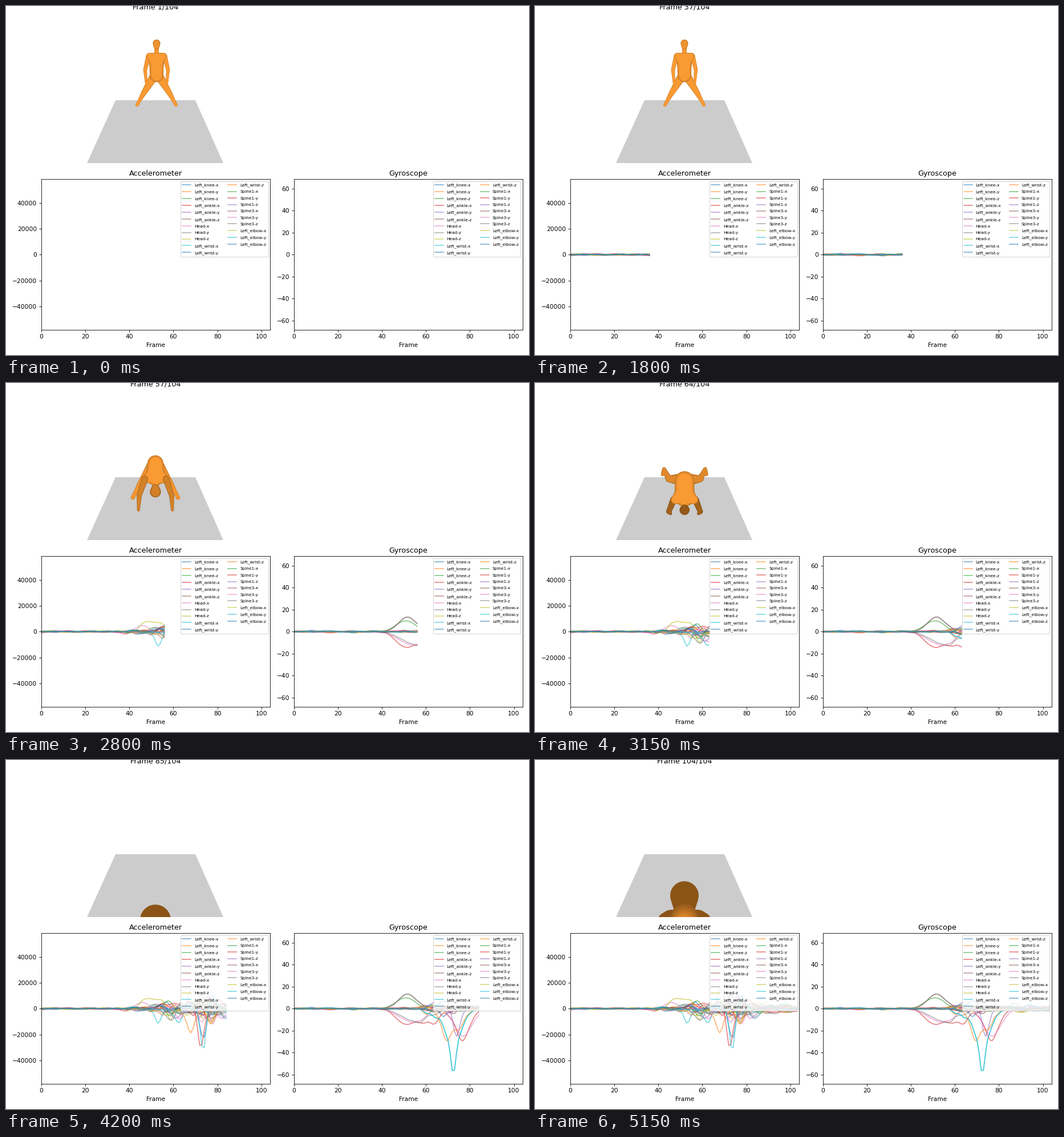
Recreate the animation shown at these times as a matplotlib script. Size 917x611 px, loop 5.2 s.

```python
import numpy as np
import matplotlib.pyplot as plt
from matplotlib.animation import FuncAnimation
from matplotlib.collections import PolyCollection
from matplotlib.colors import to_rgb
from matplotlib.patches import Polygon

W, H, DPI, N = 917, 611, 76.4, 104
plt.rcParams["font.family"] = "DejaVu Sans"
fig = plt.figure(figsize=((W + 0.001) / DPI, (H + 0.001) / DPI), dpi=DPI, facecolor="white")


def axes_px(x0, y0, x1, y1):
    return fig.add_axes([x0 / W, 1 - y1 / H, (x1 - x0) / W, (y1 - y0) / H])


def smooth(k, a, b):
    u = np.clip((k - a) / (b - a), 0, 1)
    return u * u * (3 - 2 * u)


def bump(k, c, w):
    return np.exp(-0.5 * ((k - c) / w) ** 2)


# --- sensor data -------------------------------------------------------
PARTS = ["Left_knee", "Left_ankle", "Head", "Left_wrist", "Spine1", "Spine3", "Left_elbow"]
LABELS = [f"{p}-{a}" for p in PARTS for a in "xyz"]
t = np.arange(N)

# strongest swings: channel, centre, height, width
ACC_SWINGS = [
    ("Head-z", 50, 9500, 3.4), ("Head-z", 59, -10500, 1.9), ("Head-x", 45, 5000, 2.5),
    ("Left_wrist-x", 53, -10000, 1.3), ("Left_wrist-z", 67.8, -20000, 1.8),
    ("Left_ankle-x", 72.4, -22000, 1.2), ("Left_elbow-y", 73.7, -31500, 1.2),
    ("Head-x", 78, -17000, 1.6),
]
GYRO_SWINGS = [
    ("Knee-turn", 0, 0, 1), ("Left_knee-z", 51, 10, 4.5), ("Spine3-z", 52, 13.5, 4.2),
    ("Left_ankle-x", 51, -14, 4.3), ("Left_ankle-x", 62, -15, 4), ("Left_ankle-x", 77, -30, 2.8),
    ("Head-y", 56, -12, 7), ("Head-x", 54, -12, 6), ("Head-x", 77, -24, 4),
    ("Left_wrist-z", 71.5, -27, 4), ("Left_ankle-y", 74, -27, 1.6),
    ("Left_wrist-x", 72.5, -33, 1.1), ("Left_wrist-x", 72, -29, 4.4),
][1:]


def signals(swings, envelope, seed):
    rng = np.random.default_rng(seed)
    kernel = bump(np.arange(-5, 6), 0, 1.4)
    rows = {}
    for name in LABELS:
        noise = np.convolve(rng.normal(size=N + 10), kernel, "valid")
        rows[name] = envelope * rng.uniform(0.5, 1.4) * noise / noise.std()
    for name, c, h, w in swings:
        rows[name] += h * bump(t, c, w)
    return rows


acc = signals(ACC_SWINGS, 260 + 700 * bump(t, 45, 5) + 3000 * bump(t, 60, 5)
              + 5500 * bump(t, 74, 5) + 1500 * bump(t, 90, 9), 4)
gyro = signals(GYRO_SWINGS, 0.35 + 2.6 * bump(t, 69, 7) + 1.1 * bump(t, 92, 9), 9)
gyro["Left_elbow-y"] = gyro["Left_wrist-x"]
gyro["Left_ankle-z"] = gyro["Spine3-z"]


def plot(x0, x1, title, lim, step, top):
    ax = axes_px(x0, 303.5, x1, 567)
    ax.set(xlim=(0, N), ylim=(-lim, lim), title=title, xlabel="Frame",
           xticks=range(0, 101, 20), yticks=range(-top, top + 1, step))
    lines = [ax.plot([], [], color=f"C{i % 10}", alpha=0.6, label=s)[0]
             for i, s in enumerate(LABELS)]
    ax.legend(loc="upper right", ncol=2, fontsize=7, labelspacing=0.69)
    return lines


acc_lines = plot(61.5, 463.3, "Accelerometer", 58100, 20000, 40000)
gyro_lines = plot(504.5, 906, "Gyroscope", 68.4, 20, 60)

# --- scene -------------------------------------------------------------
scene = axes_px(62, 0, 463, 275)
scene.set(xlim=(62, 463), ylim=(275, 0))
scene.axis("off")
scene.add_patch(Polygon([(192, 165), (332, 165), (381, 275), (142, 275)], fc="#cccccc", lw=0))
body = PolyCollection([], linewidths=0, zorder=3)
scene.add_collection(body, autolim=False)
caption = scene.text(262, 5.5, "", fontsize=12, ha="center", va="baseline", clip_on=False)

HORIZON, EYE, DIST = 9.4, 162, 300
DARK = np.array(to_rgb("#8b5417"))
BRIGHT = np.array(to_rgb("#fa9a33"))
LAYERS = [(1, 0.42), (0.88, 0.16), (0.74, 0)]


def shade(dark):
    return BRIGHT + (DARK - BRIGHT) * min(1, dark)


def arc(c, r, a, b):
    s = np.linspace(a, b, 16)
    return np.column_stack([c[0] + r * np.cos(s), c[1] + r * np.sin(s)])


def capsule(p, q, r1, r2):
    dx, dy = q[0] - p[0], q[1] - p[1]
    d = np.hypot(dx, dy)
    if d <= abs(r1 - r2) + 1e-6:
        return arc(p if r1 > r2 else q, max(r1, r2), 0, 2 * np.pi)
    phi, b = np.arctan2(dy, dx), np.arccos((r1 - r2) / d)
    return np.vstack([arc(p, r1, phi + b, phi + 2 * np.pi - b), arc(q, r2, phi - b, phi + b)])


def project(p, cx):
    x, y, z = p
    s = DIST / (DIST - min(z, 240))
    return (cx + s * x, HORIZON + s * (EYE - max(y, 3))), s


def limbs_at(k):
    """Forward roll towards the camera: groups of (joint, joint, radius, radius)."""
    sit, tuck, late = bump(k, 72.4, 4), bump(k, 67, 6), smooth(k, 86, 103)
    trunk = 2 * np.pi * smooth(k, 42, 82)
    leg = 2 * np.pi * smooth(k, 55, 81)
    reach = 1.2 * sit
    hip_y = 50 - 47 * sit - 9 * smooth(k, 74, 84) + 5 * late
    hip_z = 125 * smooth(k, 44, 74) + 102 * smooth(k, 70, 84) - 6 * late

    def spine(x, up):
        up *= 1 - 0.2 * tuck
        return np.array([x, hip_y + up * np.cos(trunk), hip_z + up * np.sin(trunk)])

    def on_leg(x, down, front):
        c, s = np.cos(leg), np.sin(leg)
        return np.array([x, hip_y - down * c - front * s, hip_z - down * s + front * c])

    waist, hips = spine(0, 18), spine(0, 0)
    torso = [(spine(0, 42), spine(0, 54), 4, 4), (spine(0, 27), waist, 13.5, 12.5),
             (waist, hips, 12.5, 12)]
    skull = [(spine(0, 56), spine(0, 50), 6.6, 4.8)]
    legs, arms, tops = [], [], []
    for side in (-1, 1):
        knee = on_leg(side * 22, 28, 6 + 22 * sit)
        ankle = on_leg(side * 31, 46, 0)
        legs += [(on_leg(side * 6, 4, 0), knee, 7.5, 4.6), (knee, ankle, 4.6, 2.9),
                 (ankle, on_leg(side * 33, 49, 8), 2.9, 3)]
        shoulder = spine(side * (14 - 6 * late), 34 + 10 * late)
        drop = np.array([0, -np.cos(reach), np.sin(reach)]) * 24 * (1 - 0.5 * tuck)
        out = np.array([side, 0, 0])
        lean = bump(k, 51, 5)
        elbow = shoulder + drop + out * (6 + 2 * lean)
        hand = elbow + drop * 1.1 - out * (2 + 12 * sit - 5 * lean)
        arms += [(shoulder, elbow, 4.4, 3.3), (elbow, hand, 3.3, 1.8)]
        tops.append(shoulder - 2 * out)
        torso.append((tops[-1], waist, 5.4, 10))
    torso.append((*tops, 5.4, 5.4))
    rolled = smooth(k, 64, 71)
    groups = [(legs, 0.3 * tuck + smooth(k, 74, 82)), (arms, 0.8 * smooth(k, 50, 63)),
              (torso, rolled), (skull, 0.1 + smooth(k, 50, 68))]
    return sorted(groups, key=lambda g: round(np.mean([a[2] + b[2] for a, b, *_ in g[0]]) / 20))


def draw_body(k):
    cx = 262 + 2 * (1 - smooth(k, 0, 20)) + 3 * bump(k, 72, 4)
    polys, colors = [], []
    for limbs, dark in limbs_at(k):
        for size, rim in LAYERS:
            for a, b, r1, r2 in limbs:
                (p, s1), (q, s2) = project(a, cx), project(b, cx)
                polys.append(capsule(p, q, r1 * s1 * size, r2 * s2 * size))
                colors.append(shade(dark + rim))
    # light bands on the face close to the camera
    glow = smooth(k, 86, 103)
    for i in range(6 if glow else 0):
        f = 1 - 0.08 * i
        polys.append(arc((0, 0), 1, 0, 2 * np.pi) * (25 * f, 28 * f) + (262, 279 + 2 * i))
        colors.append(shade(1 - glow * (i + 1) / 8))
    body.set_verts(polys)
    body.set_facecolor(colors)


def update(k):
    caption.set_text(f"Frame {k + 1}/{N}")
    draw_body(k)
    for lines, data in ((acc_lines, acc), (gyro_lines, gyro)):
        for line, name in zip(lines, LABELS):
            line.set_data(t[:k + 1], data[name][:k + 1])
    return [caption, body, *acc_lines, *gyro_lines]


anim = FuncAnimation(fig, update, frames=N, interval=50, repeat=True, repeat_delay=0)
plt.show()
```
